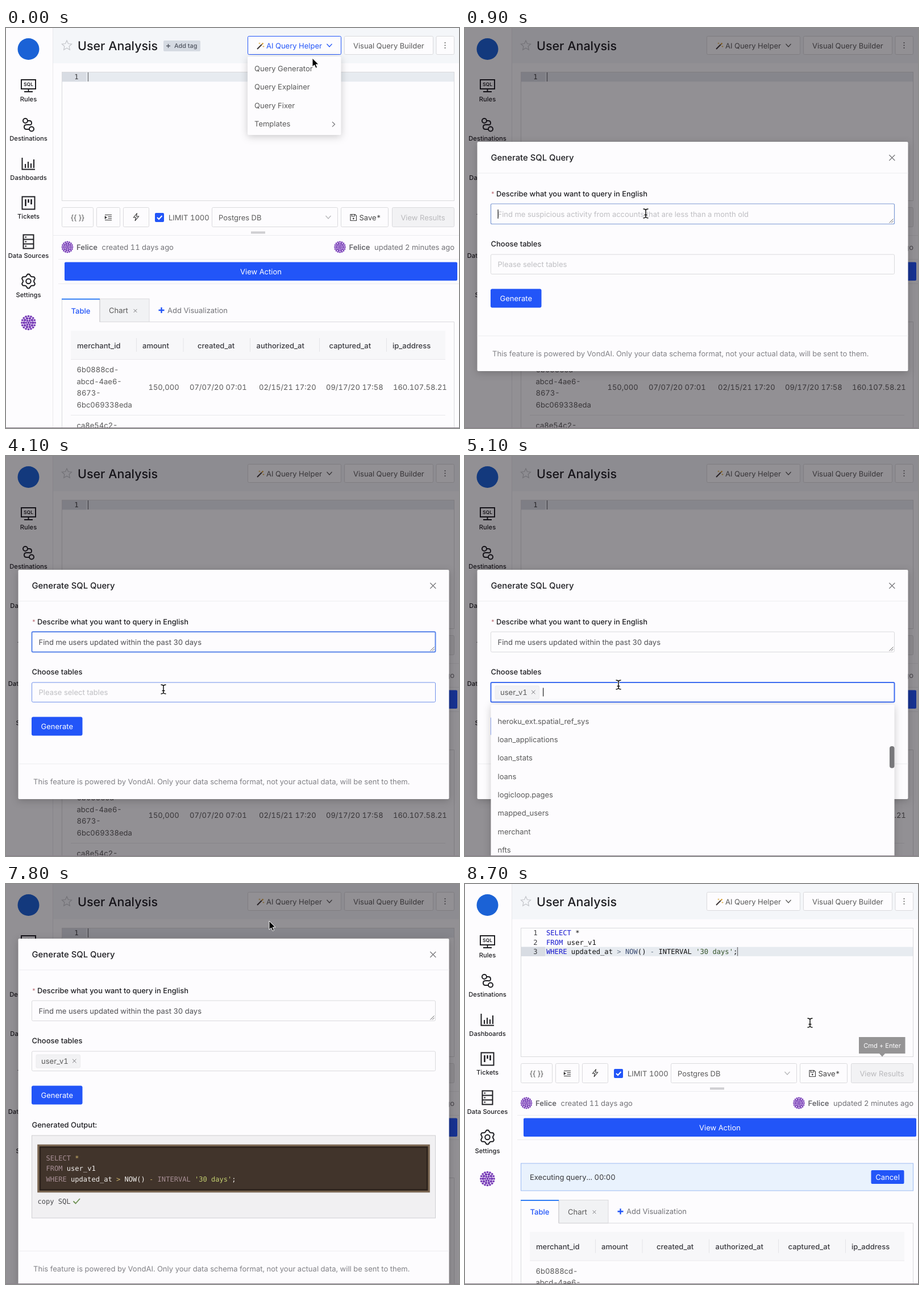
These frames come from a looping animation (797 px wide and 703 px high, 8800 ms). An HTML page:

```html
<!DOCTYPE html>
<html lang="en">
<head>
<meta charset="utf-8">
<title>Query helper</title>
<style>
html, body { margin: 0; width: 100%; height: 100%; overflow: hidden; background: #fdfcfe; }
svg { display: block; width: 797px; height: 703px; }
text { font-family: Inter, Roboto, sans-serif; font-variant-numeric: tabular-nums; white-space: pre; text-rendering: geometricPrecision; }
.mono { font-family: "DejaVu Sans Mono", "Noto Sans Mono", monospace; }
.mid { text-anchor: middle; }
.med { font-weight: 500; }
.bold { font-weight: 600; }
.float { filter: drop-shadow(0 3px 7px rgba(0, 0, 0, .2)); }
</style>
</head>
<body>
<svg id="stage" viewBox="0 0 797 703"></svg>
<script>
const BLUE = '#2255f8', INK = '#1f1f23', GREY = '#595959', LINE = '#dadadd', PAPER = '#fdfcfe';
const PROMPT = 'Find me users updated within the past 30 days';
const TABLES = ['heroku_ext.spatial_ref_sys', 'loan_applications', 'loan_stats', 'loans',
  'logicloop.pages', 'mapped_users', 'merchant', 'nfts'];

// Markup helpers
const text = (x, y, s, fill = GREY, size = 13, cls = '', id = '') =>
  `<text x="${x}" y="${y}" fill="${fill}" font-size="${size}" class="${cls}" id="${id}">${s}</text>`;
const rect = (x, y, w, h, fill = 'none', stroke = 'none', r = 0, id = '') =>
  `<rect x="${x}" y="${y}" width="${w}" height="${h}" fill="${fill}" stroke="${stroke}" rx="${r}" id="${id}"/>`;
const path = (d, stroke = GREY, w = 1, fill = 'none') =>
  `<path d="${d}" stroke="${stroke}" stroke-width="${w}" fill="${fill}"/>`;
const dot = (x, y, r, fill, stroke = 'none', w = 1) =>
  `<circle cx="${x}" cy="${y}" r="${r}" fill="${fill}" stroke="${stroke}" stroke-width="${w}"/>`;
const group = (id, body, cls = '') => `<g id="${id}" class="${cls}">${body}</g>`;
const cross = (x, y, r, color = '#77777b', w = 1) =>
  path(`M${x - r} ${y - r}l${2 * r} ${2 * r}m0 ${-2 * r}l${-2 * r} ${2 * r}`, color, w);
const chevron = (x, y, color = GREY) => path(`M${x - 4.5} ${y - 2.5}l4.5 5 4.5-5`, color, 1.2);
const code = (x, y, size, parts) => text(x, y,
  parts.map(([c, s]) => `<tspan fill="${c}">${s}</tspan>`).join(''), INK, size, 'mono');

function ring(cx, cy, n, r, shape) {
  return Array.from({ length: n }, (_, i) => {
    const a = i * 2 * Math.PI / n;
    return shape(cx + r * Math.cos(a), cy + r * Math.sin(a), i);
  }).join('');
}

function avatar(x, y, r) {
  let s = dot(x, y, r, '#eadff5');
  for (const [k, n, size] of [[.86, 16, .13], [.58, 10, .16], [.3, 6, .13]])
    s += ring(x, y, n, r * k, (a, b) => dot(a.toFixed(2), b.toFixed(2), r * size, '#7438b5'));
  return s + dot(x, y, r * .14, '#7438b5');
}

function star(x, y, r) {
  const pts = Array.from({ length: 10 }, (_, i) => {
    const a = i * Math.PI / 5 - Math.PI / 2, q = i % 2 ? r * .48 : r;
    return `${(x + q * Math.cos(a)).toFixed(1)} ${(y + q * Math.sin(a)).toFixed(1)}`;
  });
  return path(`M${pts.join('L')}Z`, '#c3c5ca', 1.2);
}

function gear(x, y) {
  const pts = Array.from({ length: 48 }, (_, i) => {
    const a = i * Math.PI / 24, q = 11 + 1.5 * Math.tanh(2 * Math.cos(6 * a + Math.PI));
    return `${(x + q * Math.cos(a)).toFixed(1)} ${(y + q * Math.sin(a)).toFixed(1)}`;
  });
  return path(`M${pts.join('L')}Z`, INK, 2) + dot(x, y, 4.2, 'none', INK, 2);
}

function sidebar() {
  const names = ['Rules', 'Destinations', 'Dashboards', 'Tickets', 'Data Sources', 'Settings'];
  return rect(0, 0, 82, 703, PAPER) + path('M82.5 0V703', '#e9e9ec') + dot(39.5, 37, 19, '#1b62d6') +
    names.map((s, i) => text(39.5, 129 + i * 68.8, s, INK, 11.2, 'mid med')).join('') +
    path('M27 91H52V107H27ZM39.5 107V112M32 112H47', INK, 2) +
    text(39.5, 102.2, 'SQL', INK, 8.5, 'mid bold') +
    dot(34, 163, 4, 'none', INK, 2) + dot(45, 177.5, 4, 'none', INK, 2) +
    path('M38 163H41Q45 163 45 167T41 170H36Q32 170 32 174T36 178H41', INK, 2) +
    path('M28.5 228V248.5H51M34 246V239M39 246V235M44 246V238M49 246V231', INK, 2) +
    path('M28.5 296.5H50.5V318.5H28.5Z', INK, 2) +
    path('M34.5 301V313M39.5 301V307M44.5 301V310', INK, 2.6) +
    path('M30.5 363.5H48.5V387.5H30.5ZM30.5 371.5H48.5M30.5 379.5H48.5', INK, 2) +
    path('M33.5 367.5h2.5M33.5 375.5h2.5M33.5 383.5h2.5', INK, 2) +
    gear(39.5, 445) + avatar(39.5, 518, 13.5);
}

function header() {
  return rect(83, 0, 714, 62, '#f4f6f9') + star(107, 31, 9) + text(126, 38.5, 'User Analysis', INK, 21.5, 'med') +
    group('addTag', rect(277, 22, 65, 19, '#d5dae2', 'none', 2) +
      path('M282 31.5h7m-3.5-3.5v7', '#4e535e', 1.3) + text(296, 35, 'Add tag', '#4e535e', 10.8, 'med')) +
    rect(425.5, 14.5, 164, 32, PAPER, LINE, 2, 'aiBox') +
    path('M442 37L450 29', '#3d3537', 2) + path('M450 29L452.5 26.5', '#d9a441', 2.4) +
    path('M446 25.5v3M444.5 27h3M453 31v3M451.5 32.5h3', '#e2b65a', 1) +
    text(458, 35.5, 'AI Query Helper', GREY, 13, '', 'aiText') +
    group('aiArrow', chevron(569, 30.5, 'currentColor')) +
    rect(595.5, 14.5, 156, 32, PAPER, LINE, 2) + text(611, 35.5, 'Visual Query Builder') +
    rect(757, 14.5, 31.5, 32, PAPER, LINE, 2) + [26, 30.5, 35].map(y => dot(772.5, y, 1, GREY)).join('');
}

function editor() {
  const num = (n, y) => text(124, y, n, '#3a3a3d', 12.15, 'mono mid');
  const row = y => rect(99, y, 689, 16.3, '#e7ebf0') + rect(99, y, 42, 16.3, '#d8dce3');
  const K = '#1616cf', O = '#687687', F = '#3c4c72', X = '#111';
  return rect(98.5, 77.5, 690, 226, PAPER, LINE) +
    group('emptyCode', row(78) + num(1, 90.3) + path('M144.5 78V94', '#77777b', 1.4)) +
    group('fullCode', row(110.6) + num(1, 90.3) + num(2, 106.6) + num(3, 122.9) +
      code(143, 90.3, 12.15, [[K, 'SELECT'], [X, ' *']]) +
      code(143, 106.6, 12.15, [[K, 'FROM'], [X, ' user_v1']]) +
      code(143, 122.9, 12.15, [[K, 'WHERE'], [X, ' updated_at '], [O, '&gt; '], [F, 'NOW'], [X, '() '],
        [O, '- '], [X, 'INTERVAL '], ['#36552c', "'30 days'"], [X, ';']]) +
      path('M479.5 111V126.5', '#77777b', 1.4));
}

function toolbar() {
  const btn = (x, w, fill = PAPER) => rect(x, 315.5, w, 34, fill, LINE, 2);
  return btn(98.5, 55) + text(126, 337.5, '{{ }}', GREY, 13, 'mid') + btn(159.5, 41) +
    path('M174 328.5H186M179.5 331.5H186M179.5 334.5H186M174 337.5H186', '#333', 1.2) +
    path('M174 330.5L177.5 333 174 335.5Z', '#333', .5, '#333') +
    btn(206.5, 45) + path('M230.5 325.5L224.5 333H228.5L227 339 233.5 331H229.5Z', '#333', 1.1) +
    rect(262, 325, 16, 16, BLUE, 'none', 2) + path('M266 333l3 3 5.5-6', '#fff', 2) +
    text(286, 337.7, 'LIMIT 1000') + btn(362.5, 221) + text(374, 337.5, 'Postgres DB') +
    chevron(567, 332.5, '#b5b5b8') + btn(589.5, 83) +
    path('M606 327.5H614L616.5 330V338.5H606ZM608.5 327.5V331H613V327.5', '#444', 1.2) + dot(611.3, 335, 1.4, '#444') +
    text(621.5, 337.5, 'Save*', '#444') +
    rect(679.5, 315.5, 109, 34, '#f2f2f4', LINE, 2, 'runBox') +
    text(733.5, 337.5, 'View Results', '#b9b9bc', 13, 'mid', 'runText') +
    rect(431, 357.5, 25, 4, '#cfcfd2') + path('M83 364.5H797M92 406.5H797M92 449.5H797', '#ececef');
}

function byline() {
  const who = (x, rest) => avatar(x, 385, 10.5) + text(x + 16, 389.8, 'Felice', '#67676c', 13, 'bold') +
    text(x + 60.5, 389.8, rest, '#727277');
  return who(108, 'created 11 days ago') + who(587.5, 'updated 2 minutes ago') +
    rect(103, 411.5, 691, 32.5, BLUE, 'none', 2) + text(448.5, 432.7, 'View Action', '#fff', 13, 'mid');
}

function results() {
  const heads = [[125, 'merchant_id'], [240, 'amount'], [337, 'created_at'], [440.5, 'authorized_at'],
    [568.5, 'captured_at'], [680, 'ip_address']];
  const cells = [[250.5, '150,000'], [323, '07/07/20 07:01'], [445, '02/15/21 17:20'],
    [563, '09/17/20 17:58'], [681, '160.107.58.21']];
  const id = ['6b0888cd-', 'abcd-4ae6-', '8673-', '6bc069338eda'];
  return rect(165.5, 476, 86.5, 40.5, '#f1f2f4', LINE) +
    path('M98.5 710V476M164.5 476V516.5H788.5V710', LINE) + path('M98 476.5H165', '#2f7df5', 2.2) +
    text(131.5, 501.5, 'Table', BLUE, 13, 'mid med') + text(181, 501, 'Chart') + cross(227.5, 497, 2.8) +
    path('M268.5 496h10m-5-5v10', BLUE, 2.4) + text(284, 500.7, 'Add Visualization', '#727277') +
    rect(114, 532, 659, 50, '#f7f7f9') + path('M114 582.5H773M114 680.5H773', '#e9e9ec') +
    path([229.5, 312, 429.5, 551.5, 669.5].map(x => `M${x} 545V569`).join(''), '#e4e4e7') +
    heads.map(([x, s]) => text(x, 562.5, s, '#3b3b40', 13, 'med')).join('') +
    id.map((s, i) => text(124.5, 605 + i * 20.7, s)).join('') +
    cells.map(([x, s]) => text(x, 636.3, s)).join('') + text(124.5, 702.5, 'ca8e54c2-');
}

function menu() {
  const items = ['Query Generator', 'Query Explainer', 'Query Fixer', 'Templates'];
  return rect(425, 50, 164.5, 138, PAPER, 'none', 2) + rect(425, 55, 164.5, 32, '#f3f3f5', 'none', 0, 'menuHover') +
    items.map((s, i) => text(437, 76 + i * 32.3, s)).join('') + path('M574 165l4.5 4.3-4.5 4.3', '#77777b', 1.2);
}

// Dialog content is laid out from the top edge of the dialog.
function dialog() {
  const K = '#a88f96', O = '#cdb36a', W = '#f2f0ee';
  const output = text(45.5, 331.5, 'Generated Output:', INK, 13, 'med') +
    rect(45.5, 346, 710, 145, '#f1f0f2', '#cfcfd2') +
    rect(57, 363.5, 687, 81, '#41342b', '#7a6652', 3) + path('M57 363.5H744V444.5H57Z', '#7a6652', 3.6) +
    path('M60 366.5H741V441.5H60Z', '#2b211b', 2.4) +
    code(70.5, 390, 12.07, [[K, 'SELECT'], [O, ' *']]) +
    code(70.5, 408.3, 12.07, [[K, 'FROM'], [W, ' user_v1']]) +
    code(70.5, 426.5, 12.07, [[K, 'WHERE'], [W, ' updated_at '], [O, '&gt;'], [W, ' NOW() '], [O, '- '],
      [K, 'INTERVAL '], ['#c3cf70', "'30 days'"], [W, ';']]) +
    text(55.5, 465.5, 'copy SQL', '#4a4a4d', 12.07, 'mono') +
    group('copied', path('M118.5 461.5l4 4 7.5-8.5', '#6d9153', 1.8));
  return rect(21.5, 0, 758, 403, PAPER, 'none', 2, 'sheet') + path('M21.5 55H779.5', '#ececef') +
    text(45.5, 32.5, 'Generate SQL Query', INK, 14.85, 'med') + cross(751.3, 28, 5, '#77777b', 1.2) +
    text(45.5, 95, '*', '#b5606a', 10.5) + text(55, 95.5, 'Describe what you want to query in English', INK, 12.9, 'med') +
    rect(45.5, 109, 710, 35.5, PAPER, LINE, 2, 'promptBox') + path('M746.5 142.5l7-7M750 142.5l3.5-3.5', '#666', 1) +
    text(57.5, 131.5, 'Find me suspicious activity from accounts that are less than a month old', '#bfbfc3', 13, '', 'promptHint') +
    text(57.5, 131.5, '', '#4f4f53', 13, '', 'prompt') + rect(57.5, 119, 1.2, 16, '#222', 'none', 0, 'promptCaret') +
    text(45.5, 184, 'Choose tables', INK, 13, 'med') + rect(45.5, 198, 710, 34.5, PAPER, LINE, 2, 'tableBox') +
    text(57.5, 220.3, 'Please select tables', '#bfbfc3', 13, '', 'tableHint') +
    text(57.5, 220.3, '', '#4f4f53', 13, '', 'search') +
    group('tag', rect(53, 204, 77.5, 23, '#f2f2f4', '#ebebed', 2) + text(62, 220, 'user_v1') + cross(120.3, 215, 3.2)) +
    rect(137, 207.5, 1.2, 15, '#222', 'none', 0, 'tableCaret') +
    rect(45.5, 259, 88.5, 32, BLUE, LINE, 2, 'genBox') + text(89.8, 279.8, 'Generate', '#fff', 13, 'mid', 'genText') +
    group('spinner', ring(0, 0, 8, 8.7, (x, y, i) => dot(x, y, 1.3 + ((i + 6) % 8) / 8, BLUE))) +
    group('output', output) +
    group('foot', path('M21.5 0H779.5', '#ececef') + text(48, 36,
      'This feature is powered by VondAI. Only your data schema format, not your actual data, will be sent to them.', '#818186', 13.05));
}

function dropdown() {
  return rect(45.5, 437, 710, 290, PAPER, 'none', 2) +
    group('allTables', TABLES.map((s, i) => text(57.5, 470.5 + i * 32.35, s)).join('') +
      rect(747, 510, 8.5, 38.5, '#77777a', 'none', 4)) +
    group('foundTables', rect(45.5, 441, 710, 32, '#f3f3f5') + text(57.5, 462, 'user_v1') + text(57.5, 494.4, 'mapped_users'));
}

const beam = 'M-4.5-8Q-1-8 0-6Q1-8 4.5-8M0-6.5V6.5M-4.5 8Q-1 8 0 6Q1 8 4.5 8M-2.5 2.5H2.5';
const stage = document.getElementById('stage');
stage.innerHTML = rect(0, 0, 797, 703, PAPER) + header() + editor() + toolbar() + byline() +
  group('running', rect(98.5, 491, 690, 48, '#e9f2fd', '#9dbcf3') + text(114, 520, 'Executing query... 00:00', '#37373b') +
    rect(714.5, 503, 58, 24, BLUE, 'none', 2) + text(743.5, 519.7, 'Cancel', '#fff', 13, 'mid')) +
  group('results', results()) + sidebar() + group('menu', menu(), 'float') +
  group('tip', path('M693 269H774.5V298H739L734 303.5 729 298H693Z', 'none', 0, 'rgba(0,0,0,.75)') +
    text(734, 288, 'Cmd + Enter', '#fff', 11.2, 'mid')) +
  rect(0, 0, 797, 703, '#0b060d', 'none', 0, 'mask') + group('dialog', dialog(), 'float') +
  group('dropdown', dropdown(), 'float') + path('M0 702.5H797', '#8b818b') +
  group('pointer', group('arrow', path('M0 0V15.2L3.6 12 6 17.4 8.6 16.3 6.2 11H11Z', '#fff', 1, '#000')) +
    group('beam', path(beam, '#fff', 3) + path(beam, '#111', 1.5)));

const $ = id => document.getElementById(id);
const show = (id, v) => $(id).setAttribute('opacity', +v);
const set = (id, attrs) => { for (const k in attrs) $(id).setAttribute(k, attrs[k]); };
const ramp = (t, a, b) => Math.min(1, Math.max(0, (t - a) / (b - a)));

// time, x, y, shape
const MOVES = [[0, 539, 53, 'arrow'], [300, 490, 72, 'arrow'], [500, 470, 90, 'arrow'], [800, 320, 322, 'beam'],
  [900, 318, 326, 'beam'], [3800, 310, 340, 'beam'], [4100, 277, 410, 'beam'], [5100, 270, 402, 'beam'],
  [5300, 266, 400, 'arrow'], [5700, 92, 476, 'arrow'], [5900, 92, 476, 'arrow'], [6300, 444.5, 471.5, 'arrow'],
  [6900, 430, 480, 'arrow'], [7300, 100, 557, 'arrow'], [7500, 100, 557, 'arrow'], [7800, 463, 65, 'arrow'],
  [8000, 463, 65, 'beam'], [8200, 480, 170, 'beam'], [8400, 730, 332, 'arrow'], [8600, 728, 330, 'beam'],
  [8700, 607, 244, 'beam'], [8800, 607, 244, 'beam']];

function movePointer(t) {
  const i = MOVES.findIndex(m => m[0] > t), a = MOVES[i - 1], b = MOVES[i];
  const k = ramp(t, a[0], b[0]), e = k * k * (3 - 2 * k);
  set('pointer', { transform: `translate(${a[1] + (b[1] - a[1]) * e} ${a[2] + (b[2] - a[2]) * e})` });
  show('arrow', a[3] === 'arrow');
  show('beam', a[3] === 'beam');
  show('pointer', t < 1200 || t >= 3800);
}

function drawPage(t) {
  const open = t < 500, pasted = t >= 8300, busy = t >= 8600, ready = pasted && !busy;
  show('addTag', open);
  show('menu', open);
  show('menuHover', t >= 200);
  set('aiBox', { stroke: open ? BLUE : LINE });
  set('aiText', { fill: open ? BLUE : GREY });
  set('aiArrow', { color: open ? BLUE : GREY });
  show('emptyCode', !pasted);
  show('fullCode', pasted);
  set('runBox', { fill: ready ? BLUE : '#f2f2f4' });
  set('runText', { fill: ready ? '#fff' : '#b9b9bc' });
  show('running', busy);
  set('results', { transform: `translate(0 ${busy ? 79.5 : 0})` });
  show('tip', t < 8400 ? 0 : t < 8700 ? 1 : .55);
}

function drawDialog(t) {
  const k = ramp(t, 400, 600) * (1 - ramp(t, 7900, 8100));
  show('mask', .44 * k);
  show('dialog', k);
  const busy = t >= 5800 && t < 6900, done = t >= 6900;
  const foot = done ? 549 : busy ? 364 : 341, top = 401.5 - (foot + 62) / 2, s = .2 + .8 * k;
  set('dialog', { transform: `translate(490 72) scale(${s}) translate(-490 ${top - 72})` });
  set('sheet', { height: foot + 62 });
  set('foot', { transform: `translate(0 ${foot})` });

  const typed = PROMPT.slice(0, Math.max(0, Math.floor((t - 1200) * .0175 + .01)));
  const focused = t >= 700 && t < 4200, settled = t > 900;
  $('prompt').textContent = typed;
  show('promptHint', !typed);
  show('promptCaret', t >= 800 && t < 3900);
  set('promptCaret', { x: 57.5 + (typed ? $('prompt').getComputedTextLength() : 0) });
  set('promptBox', {
    stroke: !focused ? LINE : settled ? '#5b86ea' : '#7d9ad4',
    'stroke-width': !focused ? 1 : settled ? 2 : 1.2
  });

  const picking = t >= 4200 && t < 5300, tagged = t >= 4900;
  const query = tagged ? '' : 'user'.slice(0, Math.max(0, Math.floor((t - 4400) / 100)));
  $('search').textContent = query;
  show('tableHint', !tagged && !query);
  show('tag', tagged);
  show('tableCaret', picking);
  set('tableCaret', { x: tagged ? 137 : 57.5 + (query ? $('search').getComputedTextLength() : 0) });
  set('tableBox', { stroke: picking ? '#3d6cf0' : t >= 4000 && t < 4200 ? '#6f90ea' : LINE, 'stroke-width': picking ? 2 : 1 });
  show('dropdown', ramp(t, 4200, 4400) * (1 - ramp(t, 5200, 5400)));
  show('allTables', !query);
  show('foundTables', !!query);

  set('genBox', { fill: busy ? '#f2f2f4' : BLUE, stroke: busy ? LINE : BLUE });
  set('genText', { fill: busy ? '#b9b9bc' : '#fff' });
  show('spinner', busy);
  set('spinner', { transform: `translate(56 327) rotate(${(t - 6300) * .36})` });
  show('output', done);
  show('copied', t >= 7400);
}

function frame(now) {
  const t = Math.floor(now % 8800 / 100) * 100;
  drawPage(t);
  drawDialog(t);
  movePointer(t);
  requestAnimationFrame(frame);
}
requestAnimationFrame(frame);
</script>
</body>
</html>
```
